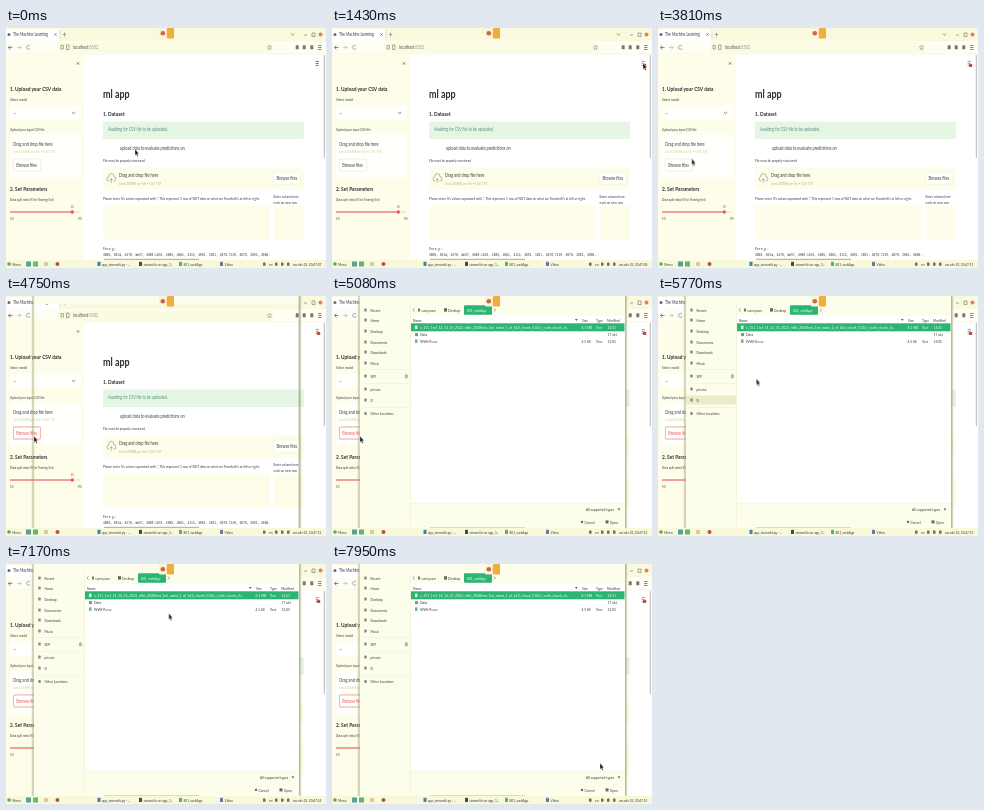
An HTML page for the animation above (7990 ms loop, 320 px wide and 240 px high).

```html
<!DOCTYPE html>
<html lang="en">
<head>
<meta charset="utf-8">
<title>ml app</title>
<style>
  html, body { margin: 0; width: 100%; height: 100%; overflow: hidden; background: #fff; }
  svg { display: block; width: 100vw; height: 100vh; font-family: Lato, "Open Sans", sans-serif; }
  text { white-space: pre; }
  .mono { font-family: "DejaVu Sans Mono", monospace; }
  #cursor { animation: move 7990ms ease-in-out infinite; }
  #arrow, #beam, #frame, #files, .menuHot, .browseHot, .placeHot { animation: 7990ms step-end infinite; }
  #arrow { animation-name: arrow; }
  #beam { animation-name: beam; }
  #frame { animation-name: frame; }
  #files { animation-name: files; }
  .menuHot { animation-name: menu; }
  .browseHot { animation-name: browse; }
  .placeHot { animation-name: place; }
  @keyframes move {
    0% { transform: translate(129px, 121px); }
    16%, 19% { transform: translate(311px, 35px); }
    32%, 36% { transform: translate(66px, 77px); }
    52% { transform: translate(28px, 140px); }
    66% { transform: translate(28px, 140px); animation-timing-function: ease-in; }
    72.2% { transform: translate(98px, 83px); animation-timing-function: ease-out; }
    79%, 87% { transform: translate(150px, 31px); }
    99%, 100% { transform: translate(268px, 199px); }
  }
  @keyframes arrow { 0% { opacity: 1 } 32% { opacity: 0 } 37% { opacity: 1 } }
  @keyframes beam { 0% { opacity: 0 } 32% { opacity: 1 } 37% { opacity: 0 } }
  @keyframes frame { 0% { opacity: 0 } 58.8% { opacity: 1 } }
  @keyframes files { 0% { opacity: 0 } 60.3% { opacity: 1 } }
  @keyframes menu { 0% { opacity: 0 } 15% { opacity: 1 } }
  @keyframes browse { 0% { opacity: 0 } 50% { opacity: 1 } }
  @keyframes place { 0% { opacity: 0 } 70% { opacity: 1 } 73.5% { opacity: 0 } }
</style>
</head>
<body>
<svg id="stage" viewBox="0 0 320 240" preserveAspectRatio="none"></svg>
<script>
const CREAM = '#fdfde9', INK = '#3c3d42', GREY = '#85857a', RED = '#f0525a', GREEN = '#2cb472';

// The wide desktop is shown on a 4:3 stage, so all lettering is narrowed alike.
const text = (x, y, size, str, fill = INK, more = '') =>
  `<text transform="translate(${x} ${y}) scale(.75 1)" font-size="${size}" fill="${fill}" ${more}>${str}</text>`;
const bold = (x, y, size, str) => text(x, y, size, str, '#2b2c33', 'font-weight="700"');
const rect = (x, y, w, h, fill, more = '') =>
  `<rect x="${x}" y="${y}" width="${w}" height="${h}" fill="${fill}" ${more}/>`;
const dot = (x, y, r, fill) => `<circle cx="${x}" cy="${y}" r="${r}" fill="${fill}"/>`;
const line = (d, stroke = GREY, width = .7, more = '') =>
  `<path d="${d}" fill="none" stroke="${stroke}" stroke-width="${width}" ${more}/>`;
const cross = (x, y, r) => line(`M${x - r} ${y - r}l${2 * r} ${2 * r}m0 ${-2 * r}l${-2 * r} ${2 * r}`, '#55564f');
const burger = color => line('M309.6 33.4h3.2m-3.2 2h3.2m-3.2 2h3.2', color, .8);

function browser() {
  return rect(0, 0, 320, 13, '#f9f9dd') + rect(0, 1, 53, 12, '#fff') + rect(0, 13, 320, 13, '#fefef4')
    + dot(3, 6.5, 1.5, '#6c6b60') + text(7, 8.4, 4.8, 'The Machine Learning ') + cross(49.5, 6.5, 1)
    + line('M54 2v9', '#d4d3b4', .6) + line('M58.5 4.5v4m-1.7-2h3.4')
    + line('M285 5.5l1.5 2 1.5-2') + line('M298 7h3M306 5h3v3.5h-3z') + dot(314.5, 6.5, 2, '#df8260')
    + line('M6.5 19.5h-4m1.8-2l-1.8 2 1.8 2', '#55564f') + line('M11 19.5h4m-1.8-2l1.8 2-1.8 2', '#bbb9a0')
    + line('M24 18a2 2 0 1 0 .2 2.5')
    + rect(52, 14.5, 215, 10, '#fbfbe2', 'rx="1.5"')
    + line('M55 17.5h2.4v3.5h-2.4zM60.5 17h2.5v4.5h-2.5z')
    + text(67, 21.4, 5.2, 'localhost<tspan fill="#99988a">:8502</tspan>', '#55564f')
    + line('M263.5 17l.7 1.8h1.5l-1.2 1.1.5 1.8-1.5-1-1.5 1 .5-1.8-1.2-1.1h1.5z', GREY, .5)
    + [289.7, 296.7, 304.3].map(x => rect(x, 17.3, 3, 4, '#77776e', 'rx=".6"')).join('')
    + line('M312 17.5h3.5m-3.5 2h3.5m-3.5 2h3.5', '#55564f')
    + line('M0 26h320', '#eeedcf', .5);
}

function sidebar() {
  const button = (border, label, cls) => `<g class="${cls}">`
    + rect(7.3, 131, 27.4, 12, '#fffffb', `rx="1.2" stroke="${border}" stroke-width=".5"`)
    + text(10.3, 138.8, 5.2, 'Browse files', label) + '</g>';
  return rect(0, 26, 78, 206, CREAM) + cross(72, 35.5, 1.1)
    + bold(4, 63, 6.4, '1. Upload your CSV data')
    + text(4, 73.2, 4.1, 'Select model')
    + rect(4, 77.5, 71, 14, '#fffffb', 'rx="1.2"') + text(7.3, 86, 5.2, '...')
    + line('M66 84l1.7 1.7 1.7-1.7', '#55564f')
    + text(4, 102.7, 4, 'Upload your input CSV file')
    + rect(4, 106.5, 71, 43.5, '#fffffb', 'rx="1.2"')
    + text(7.3, 117.5, 5.2, 'Drag and drop file here')
    + text(7.3, 125, 4, 'Limit 200MB per file • CSV, TXT', '#d0d0a0')
    + button('#dcdcc6', INK, '') + button(RED, RED, 'browseHot')
    + bold(4, 163, 6.4, '2. Set Parameters')
    + text(4, 173, 3.9, 'Data split ratio (% for Training Set)')
    + line('M4 184h70', '#dedcc0', 1) + line('M4 184h62', RED, 1) + dot(66.3, 184, 1.7, RED)
    + text(64.8, 180.3, 3.8, '80', RED) + text(4, 191.5, 3.8, '10') + text(72, 191.5, 3.8, '90');
}

function page() {
  return bold(97, 70, 12, 'ml app') + bold(97, 87.5, 6.4, '1. Dataset')
    + rect(97, 93.5, 201, 17.5, '#e6f6e4', 'rx="1.2"')
    + text(102, 103.4, 4.95, 'Awaiting for CSV file to be uploaded.', '#4c9681')
    + text(114, 122, 5.15, 'upload data to evaluate predictions on')
    + text(97, 134.3, 4, 'File must be properly structured')
    + rect(97, 139, 201, 22.5, CREAM, 'rx="1.2"')
    + line('M103.3 153h-.6a1.7 2 0 0 1 0-4a2.6 3.3 0 0 1 5.2-.4a1.9 2.2 0 0 1 .2 4.4h-.8M105.3 154.6v-4m-1.2 1.4l1.2-1.4 1.2 1.4', '#96978e', .7)
    + text(113, 149.2, 5.2, 'Drag and drop file here')
    + text(113, 156.5, 4, 'Limit 200MB per file • CSV, TXT', '#b5b594')
    + rect(267.5, 144, 27, 12.5, '#fffffb', 'rx="1.2" stroke="#eeeed2" stroke-width=".5"')
    + text(270.5, 152, 5.2, 'Browse files')
    + text(97, 171.6, 4.25, "Please enter X's values separated with ','. This represent 1 row of NOT data on what we TransferX's at left or right.")
    + text(267.5, 169.5, 4.2, 'Enter column here') + text(267.5, 175.7, 4.2, 'each on new row')
    + rect(97, 178, 167, 33.5, CREAM, 'rx="1"') + rect(267.5, 178, 30.5, 33.5, CREAM, 'rx="1"')
    + text(97, 222, 4.5, 'For e. g. :')
    + text(97, 228, 4, '4000, 501m, 4470, mm57, 4069.1633, 4085, 4061, 4113, 4091, 1851, 4070.7139, 4070, 2001, 4006.', INK, 'class="mono"')
    + line('M98 231.3h95', '#a9a896', 1)
    + line('M318.3 27v103', '#b4b4aa', 1)
    + burger('#55564f')
    + `<g class="menuHot">${rect(308.5, 32, 6, 8, '#fff')}${burger(RED)}${rect(311, 36, 3.2, 3, '#c94b42')}</g>`;
}

function taskbar() {
  const task = (x, color, label) => rect(x, 233.8, 3, 4.2, color, 'rx=".5"') + text(x + 4.5, 237.7, 4.3, label);
  const tray = [257, 263, 269, 275, 281].map((x, i) => i === 1
    ? text(x, 237.7, 4.2, 'en') : rect(x, 234.4, 2.5, 3.3, '#6d6d64', 'rx=".5"')).join('');
  return rect(0, 232, 320, 8, '#f8f8da') + dot(3, 236, 1.8, '#62a85c') + text(6.2, 237.7, 4.3, 'Menu')
    + rect(20, 233.5, 5, 5, '#5d9e93') + rect(27, 233.5, 5, 5, '#5fb878') + dot(51.5, 236, 2, '#b65443')
    + rect(38, 234, 4, 4, '#d8cf95')
    + task(91.5, '#4382ad', 'app_streamlit.py - ...') + task(133, '#474a4d', 'streamlit run app_1...')
    + task(173, '#5cb16f', '801_webApp') + task(214, '#6b77a8', 'Video') + tray
    + text(287, 237.7, 4.2, 'wo okt-25, <tspan id="clock"></tspan>');
}

// The window frame and its shadow come up a moment before the file list.
function dialog() {
  const places = [['Recent', 14], ['Home', 24], ['Desktop', 35], ['Documents', 46], ['Downloads', 56], ['Music', 67],
    ['SEP', 80], ['private', 93], ['D', 104], ['Other Locations', 117.5]];
  const place = ([name, y]) => rect(32.3, y - 1.4, 2.4, 2.9, '#8a8a7e', 'rx=".6"') + text(38.5, y + 1.6, 4.4, name);
  const row = (y, name, size, type, time, color = INK) => text(88, y, 4.6, name, color)
    + text(249.5, y, 4.4, size, color) + text(264, y, 4.4, type, color) + text(275.5, y, 4.4, time, color);
  return '<g id="frame">'
    + rect(28, 0, 265, 8, '#fdfdee')
    + line('M27 0v232M294 0v232', '#9a9a62', 2.4, 'opacity=".4"') + line('M293.2 0v231.5', '#8f9596', .6) + '</g>'
    + '<g id="files">'
    + rect(28, 0, 265, 231.5, '#fdfdec') + rect(79, 20, 213.5, 187, '#fff')
    + `<g class="placeHot">${rect(28, 99.5, 50, 9, '#ecebcb')}</g>`
    + places.map(place).join('')
    + line('M30 73.5h47m-47 14h47m-47 24h47M78.5 8v223M79 207.3h214', '#ecebcf', .5)
    + line('M73 80.2l1.4-1.8 1.4 1.8zM73 81.7h2.8', '#66665c', .6)
    + line('M82.5 12.3l-1.5 1.7 1.5 1.7') + rect(86, 12.5, 2, 3, '#77776b')
    + text(89.3, 15.7, 4.4, 'sunnyuser') + rect(112, 12.2, 3, 3.4, '#66665c') + text(116, 15.7, 4.4, 'Desktop')
    + rect(132, 9.2, 28, 9.6, GREEN, 'rx="1"') + text(135, 15.7, 4.4, '801_webApp', '#eafff0')
    + line('M162 12.3l1.5 1.7-1.5 1.7')
    + text(81, 25.5, 4.4, 'Name') + '<path d="M243 23h2.6l-1.3 2z" fill="#55564f"/>'
    + text(250, 25.5, 4.4, 'Size') + text(264, 25.5, 4.4, 'Type') + text(275, 25.5, 4.4, 'Modified')
    + rect(79, 27.3, 213.5, 8, GREEN) + rect(83, 29.6, 2.5, 3.5, '#dcf5df')
    + row(32.9, 'x_151_1mf_14_14_35_2023_rdkit_2048feat_1ml_robot_1_of_b10_chunk_5104_t_with_chunk_ch...', '8.1 MB', 'Text', '14:31', '#effff2')
    + rect(83, 37.1, 3, 3, '#67a575') + row(40.2, 'Data', '', '', '17 okt')
    + rect(83, 43.4, 2.5, 3.5, '#70b878') + row(47, 'WWH5.csv', '4.5 kB', 'Text', '15:05')
    + text(254, 214.7, 4.4, 'All supported types') + '<path d="M285.5 212.5h2.8l-1.4 2z" fill="#55564f"/>'
    + dot(250, 225.9, 1.2, '#66665c') + text(252.5, 227.5, 4.6, 'Cancel')
    + rect(273.5, 224.4, 3, 3, '#66665c') + text(277.7, 227.5, 4.6, 'Open') + '</g>';
}

const recorder = rect(152.8, 0, 8, 10.5, '#fbf3dc', 'rx="1.5"') + dot(156.8, 5.3, 2.3, '#d0663c')
  + rect(160.8, 0, 7.2, 10.5, '#eeae3c', 'rx="1"');

const cursor = `<g id="cursor">
  <path id="arrow" d="M0 0v6.4l1.2-1.2 1 2.4 1.1-.6-1-2.2h1.7z" fill="#161616" stroke="#fff" stroke-width=".4"/>
  <path id="beam" d="M-1 0h2M0 0v5M-1 5h2" fill="none" stroke="#333" stroke-width=".6"/></g>`;

document.getElementById('stage').innerHTML = rect(0, 0, 320, 240, '#fff')
  + browser() + sidebar() + page() + dialog() + taskbar() + recorder + cursor;

const clock = document.getElementById('clock');
const start = performance.now();
function tick() {
  const ms = (performance.now() - start) % 7990;
  const seconds = 7 + Math.floor(ms / 1000 + .4);
  clock.textContent = '20:47:' + String(seconds).padStart(2, '0');
  requestAnimationFrame(tick);
}
tick();
</script>
</body>
</html>
```
